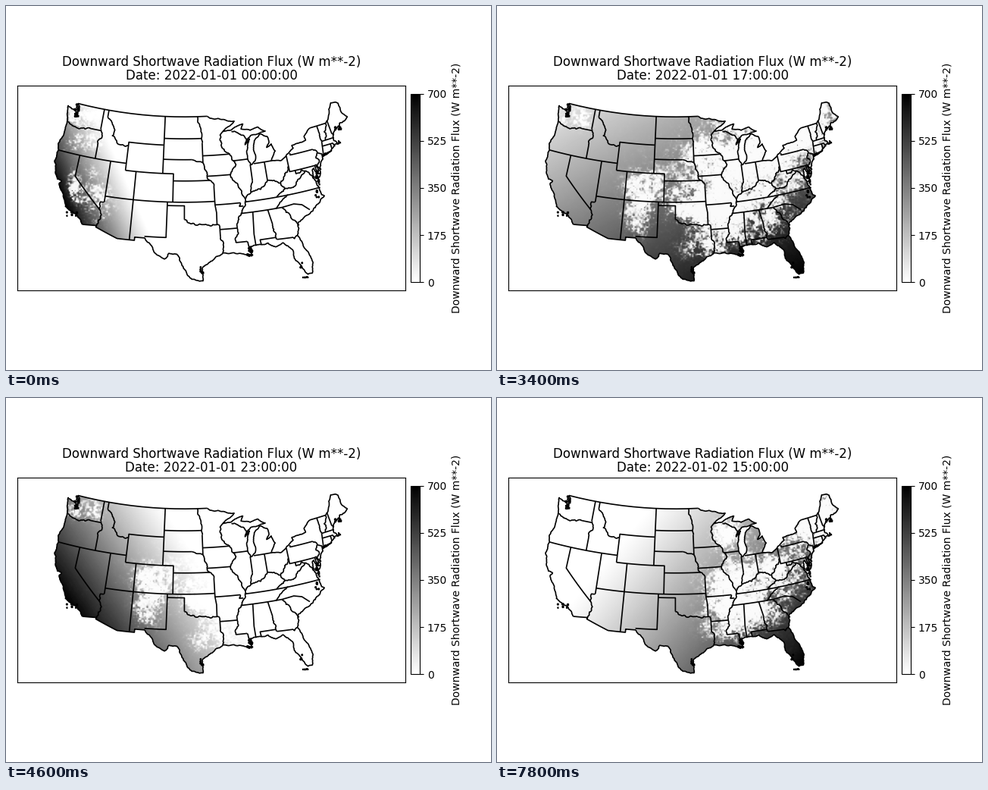
Write a matplotlib script that moves like this. It is 640 px wide and 480 px high and loops after 8000 ms.

```python
import numpy as np
import matplotlib.pyplot as plt
from matplotlib.animation import FuncAnimation
from matplotlib.collections import LineCollection
from matplotlib.path import Path

W, H = 640, 480
X0, Y0, RHO, CONE, LON0 = 235.4, -420.2, 1052.7, 0.63, -100
LEFT, RIGHT, TOP, BOTTOM = 15, 527, 105, 375
LABEL = "Downward Shortwave Radiation Flux (W m**-2)"

rng = np.random.default_rng(4)
borders = []


def project(lon, lat):
    """Lambert conformal, straight to stage pixels."""
    rho = RHO * np.tan(np.pi / 4 - np.radians(lat) / 2) ** CONE
    t = CONE * np.radians(lon - LON0)
    return np.column_stack([X0 + rho * np.sin(t), Y0 + rho * np.cos(t)])


def unproject(x, y):
    rho = np.hypot(x - X0, y - Y0)
    lon = LON0 + np.degrees(np.arctan2(x - X0, y - Y0)) / CONE
    lat = 90 - 2 * np.degrees(np.arctan((rho / RHO) ** (1 / CONE)))
    return lon, lat


def split(a, b, amp):
    """Midpoint displacement until the pieces are short."""
    d = b - a
    size = np.hypot(*d)
    if size < 2:
        return [b]
    bend = rng.uniform(-amp, amp) * min(size, 10) / size
    mid = (a + b) / 2 + bend * np.array([-d[1], d[0]])
    return split(a, mid, amp) + split(mid, b, amp)


def line(*c):
    """Survey line: even steps in longitude and latitude."""
    p = np.array(c, float).reshape(-1, 2)
    i = np.arange(len(p))
    k = np.linspace(0, i[-1], 12 * i[-1] + 1)
    pts = project(np.interp(k, i, p[:, 0]), np.interp(k, i, p[:, 1]))
    borders.append(pts)
    return pts


def parallel(lat, west, east):
    return line(west, lat, east, lat)


def meridian(lon, south, north):
    return line(lon, south, lon, north)


def river(*c, amp=0.2):
    """Jagged line through a few key points."""
    p = np.array(c, float).reshape(-1, 2)
    p = project(p[:, 0], p[:, 1])
    pts = [p[0]]
    for a, b in zip(p, p[1:]):
        pts += split(a, b, amp)
    borders.append(np.array(pts))
    return borders[-1]


def isles(lon, lat, dx, dy, count, size=1.2):
    a = np.linspace(0, 2 * np.pi, 7)
    loop = np.column_stack([np.cos(a), np.sin(a)])
    home = project(np.array([lon]), np.array([lat]))[0]
    for _ in range(count):
        mid = home + rng.uniform(-1, 1, 2) * (dx, dy)
        borders.append(mid + size * rng.uniform(0.4, 1) * loop)


# Outer edge, clockwise from the north-west corner
land = Path(np.vstack([
    river(-124.7, 48.4, -122.8, 48.1, -122.7, 47.1, -122.3, 47.6, -122.8, 49),
    parallel(49, -122.8, -95.15),
    river(-95.15, 49, -94.6, 48.7, -92.9, 48.6, -90.8, 48.1, -89.6, 48,
          -92.1, 46.75, -90.6, 46.8, -87.9, 47.47, -88.4, 46.8,
          -86.6, 46.45, -85, 46.75, -83.6, 46, -84.7, 45.9, amp=0.1),
    river(-84.7, 45.9, -86.7, 45.7, -87.6, 45.1, -88, 44.55, -87, 45.28,
          -87.8, 43.7, -87.8, 42.3, -87.3, 41.62, -86.5, 42.1, -86.3, 43,
          -86.5, 43.7, -86.1, 44.9, -84.75, 45.78, amp=0.1),
    river(-84.75, 45.78, -83.4, 45.2, -83.3, 44.3, -83.9, 43.7, -82.9, 44.07,
          -82.4, 43, -83.45, 41.73, -81.7, 41.5, -78.9, 42.85, -79.05, 43.26,
          -76.2, 43.5, -76.3, 44.1, -74.75, 45, amp=0.08),
    parallel(45, -74.75, -71.5),
    river(-71.5, 45, -70.8, 45.4, -70, 46.7, -69.2, 47.46, -68.3, 47.36,
          -67.8, 47.07, -67.8, 45.7, -66.97, 44.8, amp=0.08),
    river(-66.97, 44.8, -68.8, 44.4, -70.6, 43.4, -71, 42.3, -70.5, 41.8,
          -70, 41.8, -70.2, 42.08, -69.95, 41.7, -71.4, 41.5, -73.9, 40.75,
          -74, 40.3, -74.9, 38.95, -75.55, 39.6),
    river(-75.55, 39.6, -75.1, 38.6, -75.97, 37.15, -75.9, 38, -76.1, 39.4,
          -76.5, 38.7, -76.3, 37, -75.55, 35.25, -77.9, 33.87, -79.2, 33.2,
          -81.1, 32, -81.45, 30.7),
    river(-81.45, 30.7, -80.55, 28.4, -80.05, 26.9, -80.4, 25.2, -81.1, 25.15,
          -82.7, 27.7, -82.7, 28.9, -84, 30.1, -85.3, 29.7, -86.4, 30.4,
          -89.5, 30.2, -89.1, 29, -92, 29.6, -93.84, 29.7, amp=0.12),
    river(-93.84, 29.7, -95, 29.2, -97.2, 27.7, -97.15, 25.96, -99.1, 26.4,
          -101.2, 29.7, -102.5, 29.8, -103.15, 28.98, -104.5, 29.6,
          -106.53, 31.78, amp=0.14),
    line(-106.53, 31.78, -108.21, 31.78, -108.21, 31.33, -111.07, 31.33,
         -114.81, 32.5, -114.72, 32.72, -117.12, 32.53),
    river(-117.12, 32.53, -118.4, 33.75, -120.5, 34.5, -121.9, 36.6,
          -122.5, 37.5, -122.2, 37.9, -123, 38, -123.8, 39.3, -124.36, 40.4,
          -124.2, 42, amp=0.12),
    river(-124.2, 42, -124.55, 42.83, -124, 45, -124, 46.2, -124.7, 48.4,
          amp=0.1),
]))

# Western states
river(-124, 46.2, -122.8, 45.8, -121.2, 45.65, -119, 46)
parallel(46, -119, -116.92)
meridian(-117.03, 46.2, 49)
river(-116.95, 46.2, -116.6, 45.5, -117.2, 44.4, -117.03, 43.85)
meridian(-117.03, 42, 43.85)
parallel(42, -124.2, -111.05)
meridian(-116.05, 48, 49)
river(-116.05, 48, -114.4, 46.65, -114.5, 45.57, -113, 44.5, -111.05, 44.5)
line(-111.05, 41, -111.05, 45, -104.05, 45)
line(-111.05, 41, -102.05, 41, -102.05, 37)
line(-120, 42, -120, 39, -114.63, 35)
meridian(-114.05, 36.2, 42)
river(-114.05, 36.2, -114.7, 36.1, -114.63, 35, -114.2, 34.3, -114.72, 32.72)
parallel(37, -114.05, -94.62)
meridian(-109.05, 31.33, 41)
line(-103, 37, -103.04, 32, -106.62, 32)

# Plains
meridian(-104.05, 41, 49)
parallel(45.94, -104.05, -96.56)
parallel(43, -104.05, -98.5)
parallel(40, -102.05, -95.3)
line(-103, 36.5, -100, 36.5, -100, 34.56)
river(-100, 34.56, -97, 33.8, -94.04, 33.55)
meridian(-94.04, 32, 33.55)
river(-94.04, 32, -93.6, 31, -93.84, 29.7)
line(-94.48, 33.64, -94.43, 35.4, -94.62, 36.5, -94.62, 39.1)
parallel(33, -94.04, -91.17)
river(-98.5, 43, -96.45, 42.5, -95.8, 40.6, -94.62, 39.1)
parallel(36.5, -94.62, -90.15)
river(-90.15, 36.5, -90.37, 36, -89.7, 36)
parallel(40.6, -95.8, -91.4)
parallel(43.5, -96.45, -91.2)
meridian(-96.45, 42.5, 45.3)
river(-96.45, 45.3, -96.56, 45.94, -97.23, 49)

# Middle
river(-92.1, 46.75, -92.87, 45.6, -92.7, 44.75, -91.2, 43.5, -90.2, 41.9,
      -91.1, 41, -91.4, 40.2, -90.2, 38.7, -89.2, 37, -90.1, 35.1,
      -91.1, 33.6, -91, 32.3, -91.6, 31)
parallel(31, -91.6, -89.73)
river(-89.73, 31, -89.55, 30.2)
parallel(42.5, -90.64, -87.8)
river(-90.4, 46.57, -88.1, 45.9, -87.6, 45.1)
meridian(-87.53, 39.35, 41.72)
river(-87.53, 39.35, -88.05, 37.8)
river(-89.2, 37, -88.05, 37.8, -86.3, 38, -84.82, 39.1, -82.6, 38.42,
      -81.75, 39.2, -80.6, 40.5)
meridian(-84.81, 39.1, 41.74)
parallel(41.74, -86.82, -83.45)

# East
line(-80.52, 41.98, -80.52, 39.72, -75.79, 39.72, -75.4, 39.8)
line(-79.76, 42.27, -79.76, 42, -75.35, 42)
river(-75.35, 42, -74.7, 41.36, -75.2, 40.7, -74.75, 40.2, -75.55, 39.6)
line(-74.7, 41.36, -73.9, 41, -74, 40.7)
line(-73.65, 41, -73.27, 42.75)
river(-73.27, 42.75, -73.35, 45, amp=0.1)
line(-73.5, 42.05, -71.38, 42.02, -71.13, 41.5)
meridian(-71.83, 41.32, 42.02)
parallel(42.73, -73.27, -70.85)
river(-72.46, 42.73, -71.5, 45)
line(-71.08, 45.3, -70.98, 43.4, -70.7, 43.07)
line(-75.79, 39.72, -75.7, 38.46, -75.05, 38.45)
meridian(-79.48, 39.2, 39.72)
river(-79.48, 39.2, -78.3, 39.6, -77.1, 38.8, -76.4, 38)
river(-77.75, 39.32, -79.3, 38.42, -80.3, 37.55, -81.97, 37.54, -83.68, 36.6)
river(-82.6, 38.42, -81.97, 37.54)
parallel(36.55, -89.42, -75.87)
river(-81.68, 36.59, -82.9, 35.95, -84.32, 35)
parallel(35, -90.3, -83.1)
line(-83.1, 35, -81, 35.15, -79.67, 34.8, -78.55, 33.86)
river(-83.1, 35, -81.95, 33.45, -80.9, 32.03)
line(-88.2, 35, -88.47, 31.9, -88.4, 30.35)
line(-85.6, 35, -85.18, 32.87)
river(-85.18, 32.87, -85, 31, -84.86, 30.7)
line(-85, 31, -87.6, 31, -87.5, 30.28)
line(-84.86, 30.7, -82.2, 30.57)
river(-82.2, 30.57, -82.05, 30.36, -81.45, 30.7)

# Islands and broken shores
river(-74, 40.6, -73.7, 40.85, -72, 41.07, -74, 40.6, amp=0.08)
isles(-122.6, 48, 2.5, 8, 14, 1.5)
isles(-119, 33.6, 8, 4, 7)
isles(-76.2, 37, 3, 18, 14)
isles(-89.5, 29.5, 3, 5, 12, 1.4)
isles(-69.5, 43.9, 5, 3, 6)
isles(-81.9, 26.5, 2, 4, 4)
isles(-81.3, 24.8, 7, 0.7, 5, 0.8)
isles(-97.2, 27.6, 3, 5, 5)

xs = np.arange(LEFT, RIGHT) + 0.5
ys = np.arange(TOP, BOTTOM) + 0.5
gx, gy = np.meshgrid(xs, ys)
lon, lat = unproject(gx, gy)
inside = land.contains_points(
    np.column_stack([gx.ravel(), gy.ravel()])).reshape(gx.shape)


def noise(seed):
    """Bilinear value noise over several scales."""
    r = np.random.default_rng(seed)
    out = np.zeros(gx.shape)
    for step in (32, 14, 6, 3, 2):
        rows, cols = (np.arange(n) / step for n in gx.shape)
        i, j = rows.astype(int), cols.astype(int)
        g = r.standard_normal((i[-1] + 2, j[-1] + 2))
        f, e = (rows - i)[:, None], cols - j
        g = g[i] * (1 - f) + g[i + 1] * f
        out += g[:, j] * (1 - e) + g[:, j + 1] * e
    return out / out.std()


def cover(*blobs):
    """Cloud tendency from soft ellipses: x, y, radii, weight."""
    return sum(w * np.exp(-((gx - x) / rx) ** 2 - ((gy - y) / ry) ** 2)
               for x, y, rx, ry, w in blobs)


skies = [
    (cover((105, 145, 28, 14, 1.7), (105, 180, 30, 14, 0.9),
           (90, 243, 10, 22, 1.1), (120, 250, 25, 40, 0.8)), noise(11)),
    (cover((320, 215, 65, 62, 2.4), (410, 165, 55, 45, 2.4),
           (285, 265, 45, 22, 1.8), (195, 245, 28, 30, 1.5),
           (185, 285, 16, 20, 0.9), (275, 315, 30, 22, 1.2),
           (345, 290, 45, 30, 0.8), (105, 148, 26, 14, 1.1)), noise(12)),
    (cover((350, 235, 55, 32, 2), (315, 290, 38, 32, 2),
           (300, 180, 17, 18, 2.2), (425, 160, 58, 42, 2.4),
           (295, 245, 25, 30, 0.9), (355, 278, 22, 18, 1.2)), noise(13)),
]


def flux(hour):
    dec, phi = np.radians(-23), np.radians(lat)
    angle = np.radians((hour % 24 - 12) * 15 + lon)
    sun = (np.sin(phi) * np.sin(dec)
           + np.cos(phi) * np.cos(dec) * np.cos(angle))
    sun = np.where(inside, np.clip(sun, 0, None), 0)
    peak = max(sun.max(), 0.04)
    bias, grain = skies[0 if hour < 8 else 1 if hour < 32 else 2]
    grain = np.roll(grain, (hour + 12) % 24 - 8, axis=1)
    patchy = 0.5 * grain * np.minimum(1, bias + 0.2)
    cloud = 1 / (1 + np.exp(-5 * (bias + patchy - 1)))
    return 700 * (sun / peak) ** 1.2 * (1 - 0.97 * cloud)


def box(x0, x1, y0, y1):
    return [x0 / W, 1 - y1 / H, (x1 - x0) / W, (y1 - y0) / H]


fig = plt.figure(figsize=(W / 100, H / 100), dpi=100)
ax = fig.add_axes(box(LEFT, RIGHT, TOP, BOTTOM))
im = ax.imshow(flux(0), cmap="gray_r", vmin=0, vmax=700, aspect="auto",
               extent=(LEFT, RIGHT, BOTTOM, TOP), interpolation="nearest")
im.set_clip_path(land, transform=ax.transData)
ax.add_collection(LineCollection(borders, colors="k", linewidths=1.2))
ax.set(xlim=(LEFT, RIGHT), ylim=(BOTTOM, TOP), xticks=[], yticks=[])
title = ax.set_title("", linespacing=0.95)
fig.colorbar(im, cax=fig.add_axes(box(534, 546.2, 116, 364)),
             ticks=range(0, 701, 175), label=LABEL)


def draw(hour):
    im.set_data(flux(hour))
    title.set_text(f"{LABEL}\nDate: 2022-01-{1 + hour // 24:02d} "
                   f"{hour % 24:02d}:00:00")
    return im, title


anim = FuncAnimation(fig, draw, frames=40, interval=200, repeat=True)
plt.show()
```
